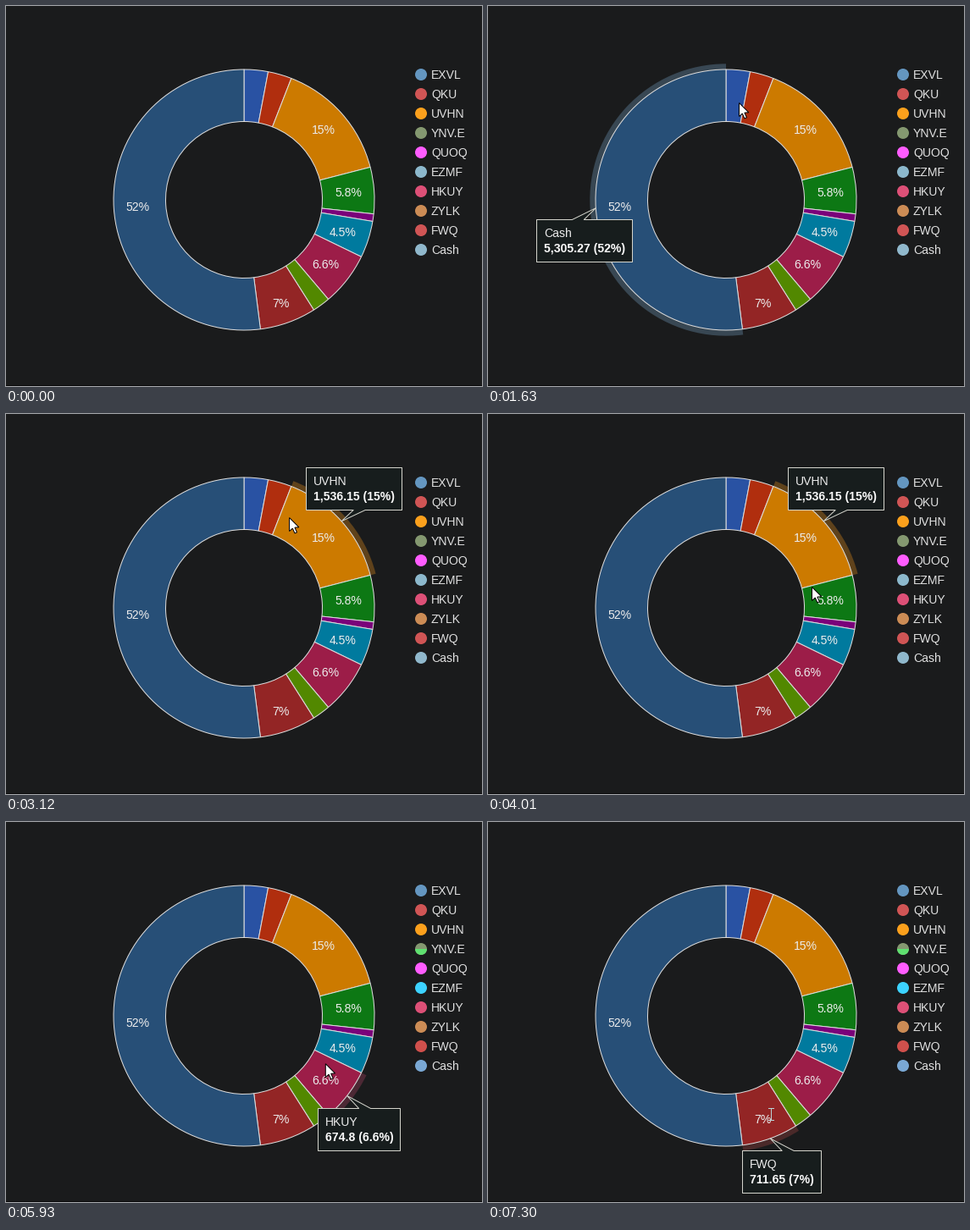
Recreate the animation shown at these times as a matplotlib script. Size 562 px wide and 449 px high, loop 7890 ms.

```python
import numpy as np
import matplotlib.pyplot as plt
from matplotlib.animation import FuncAnimation
from matplotlib.patches import Circle, Polygon, Rectangle, Wedge

W, H, DPI = 562, 449, 64
PX = 72 / DPI              # one pixel in points
LOOP, TICK = 7890, 30
CX, CY, R, HOLE = 281, 229, 154, 92.5
BG = "#1a1b1c"

plt.rcParams["font.family"] = "Liberation Sans"

# name, value, slice colour, glow colour, legend colour
SLICES = [
    ("EXVL", 302.8, "#2952a3", "#243455", "#6496c0"),
    ("QKU", 300.13, "#b02e0e", "#54241a", "#d05555"),
    ("UVHN", 1536.15, "#cc7a00", "#5f421b", "#fba01c"),
    ("YNV.E", 587.42, "#0d7814", "#174019", "#849870"),
    ("QUOQ", 93.4, "#7a007a", "#401341", "#ff5cff"),
    ("EZMF", 464.52, "#007a9e", "#25525d", "#8cb8cc"),
    ("HKUY", 674.8, "#9c1d48", "#4c2834", "#dd5077"),
    ("ZYLK", 224.27, "#528800", "#314614", "#cc8c55"),
    ("FWQ", 711.65, "#932525", "#4a2929", "#d05555"),
    ("Cash", 5305.27, "#274f77", "#384753", "#90b8cc"),
]
LABELS = [("52%", 155.5, 237), ("15%", 374.5, 146), ("5.8%", 404, 220),
          ("4.5%", 398, 267), ("6.6%", 377.5, 305), ("7%", 324.5, 351)]

# start ms, slice index, box left, top, right, second line
TIPS = [
    (800, 9, 57, 252, 171, "5,305.27 (52%)"),
    (1700, 0, 267, 12, 353, "302.8 (3%)"),
    (2440, 1, 285, 17, 391, "300.13 (2.9%)"),
    (3110, 2, 354, 63, 468, "1,536.15 (15%)"),
    (4150, 3, 402, 151, 507, "587.42 (5.8%)"),
    (4990, 5, 389, 290, 495, "464.52 (4.5%)"),
    (5860, 6, 368, 338, 466, "674.8 (6.6%)"),
    (6750, 7, 334, 367, 439, "224.27 (2.2%)"),
    (7230, 8, 300, 388, 394, "711.65 (7%)"),
]
TIP_H = 51

# start ms, end ms, steps, [(progress, x, y), ...]
MOVES = [
    (590, 870, 5, [(.2, 225, 385), (.6, 190, 250), (1, 205, 165)]),
    (1200, 1700, 8, [(0, 205, 165), (.5, 255, 128), (.875, 296, 114), (1, 296, 112)]),
    (2300, 2510, 4, [(0, 296, 112), (1, 314, 112)]),
    (3040, 3190, 3, [(0, 314, 112), (.66, 334, 122), (1, 337, 123)]),
    (3520, 4150, 10, [(0, 337, 123), (.4, 364, 170), (.8, 382, 204), (1, 382, 208)]),
    (4370, 4720, 6, [(0, 382, 208), (1, 388, 236)]),
    (4920, 5060, 3, [(0, 388, 236), (1, 390, 250)]),
    (5720, 6060, 6, [(0, 390, 250), (.66, 377, 285), (1, 366, 293)]),
    (6320, 6820, 8, [(0, 366, 293), (.5, 340, 306), (1, 346, 326)]),
    (7020, 7300, 5, [(0, 346, 326), (1, 333, 344)]),
]
LEGEND_SHIFT, BEAM_AT = 4990, 7290
ARROW = np.array([(0, 0), (0, 16), (3.8, 12.6), (6.4, 18.4), (8.9, 17.3),
                  (6.4, 11.6), (11.3, 11.3)])

fig = plt.figure(figsize=(W / DPI, H / DPI), dpi=DPI, facecolor=BG)
ax = fig.add_axes([0, 0, 1, 1])
ax.set_xlim(0, W)
ax.set_ylim(H, 0)
ax.axis("off")


def text(x, y, s, color="#ececec", z=4, **kw):
    return ax.text(x, y, s, fontsize=14 * PX, color=color, va="baseline",
                   zorder=z, **kw)


def ring(a, b, outer, inner, z, **kw):
    """Ring sector between two clockwise angles measured from the top."""
    return ax.add_patch(Wedge((CX, CY), outer, a - 90, b - 90,
                              width=outer - inner, zorder=z, **kw))


def dot(i, color):
    return ax.add_patch(Circle((490, 81 + 23 * i), 7, fc=color, lw=0, zorder=3))


ax.add_patch(Rectangle((0, H - 1), W, 1, fc="#0a0a0a", lw=0))

values = np.array([s[1] for s in SLICES])
edges = np.concatenate([[0], np.cumsum(values)]) / values.sum() * 360

glows, dots = [], []
for i, (name, _, fill, glow, key) in enumerate(SLICES):
    a, b = edges[i], edges[i + 1]
    glows.append(ring(a, b, R + 6.7, R, 1, fc=glow, lw=0))
    ring(a, b, R, HOLE, 2, fc=fill, ec="#dedede", lw=PX)
    dots.append(dot(i, key))
    text(502, 86 + 23 * i, name, color="#e0e0e0")

for s, x, y in LABELS:
    text(x, y + 5, s, ha="center")

half = ax.add_patch(Wedge((490, 150), 7, 0, 180, fc="#5fe070", lw=0, zorder=3.5))

bubble = ax.add_patch(Polygon([(0, 0), (1, 0), (1, 1)], closed=True, fc="#171d1d",
                              ec="#d4d4cc", lw=PX, joinstyle="round", zorder=6))
title = text(0, 0, "", z=7)
amount = text(0, 0, "", color="#fafafa", z=7, weight="bold")

arrow = ax.add_patch(Polygon(ARROW, closed=True, fc="white", ec="black",
                             lw=PX, zorder=9))
beam, = ax.plot([], [], color="#b9d3d6", lw=PX, zorder=9)


def outline(i, left, top, right):
    """Tooltip box with its pointer on the rim of slice i."""
    mid = np.radians((edges[i] + edges[i + 1]) / 2)
    tx, ty = CX + R * np.sin(mid), CY - R * np.cos(mid)
    l, t, r, b = left + .5, top + .5, right - .5, top + TIP_H - .5
    side = -1 if tx < CX else 1
    near, far = (tx + 14 * side, 0), (tx + 28 * side, 0)
    x1, x2 = sorted((near[0], far[0]))
    if ty > b:
        return [(l, t), (r, t), (r, b), (x2, b), (tx, ty), (x1, b), (l, b)]
    return [(l, t), (x1, t), (tx, ty), (x2, t), (r, t), (r, b), (l, b)]


def pointer(t):
    pos = None
    for start, end, n, path in MOVES:
        if t < start:
            break
        k = min(n - 1, int((t - start) / (end - start) * (n - 1)))
        p, x, y = zip(*path)
        f = (k + 1) / n
        pos = np.interp(f, p, x), np.interp(f, p, y)
    return pos


def show_tip(t):
    tip = next((q for q in reversed(TIPS) if t >= q[0]), None)
    for i, g in enumerate(glows):
        g.set_visible(tip is not None and tip[1] == i)
    for art in (bubble, title, amount):
        art.set_visible(tip is not None)
    if tip:
        _, i, left, top, right, line = tip
        bubble.set_xy(outline(i, left, top, right))
        title.set_text(SLICES[i][0])
        title.set_position((left + 9, top + 21))
        amount.set_text(line)
        amount.set_position((left + 9, top + 39))


def show_pointer(t):
    pos = pointer(t)
    is_beam = t >= BEAM_AT
    arrow.set_visible(pos is not None and not is_beam)
    beam.set_visible(is_beam)
    if is_beam:
        x, y = pos[0] + .5, pos[1] + .5
        beam.set_data([x - 3, x + 3, x, x, x - 3, x + 3],
                      [y - 7, y - 7, y - 7, y + 7, y + 7, y + 7])
    elif pos:
        arrow.set_xy(ARROW + pos + .5)


def draw(n):
    t = n * TICK + TICK - 1
    show_tip(t)
    show_pointer(t)
    late = t >= LEGEND_SHIFT
    half.set_visible(late)
    dots[5].set_facecolor("#3cd2ff" if late else SLICES[5][4])
    dots[8].set_facecolor("#d0504c" if late else SLICES[8][4])
    dots[9].set_facecolor("#7aa8d4" if late else SLICES[9][4])
    return []


anim = FuncAnimation(fig, draw, frames=LOOP // TICK, interval=TICK,
                     init_func=lambda: draw(0), repeat=True, repeat_delay=0)
plt.show()
```
